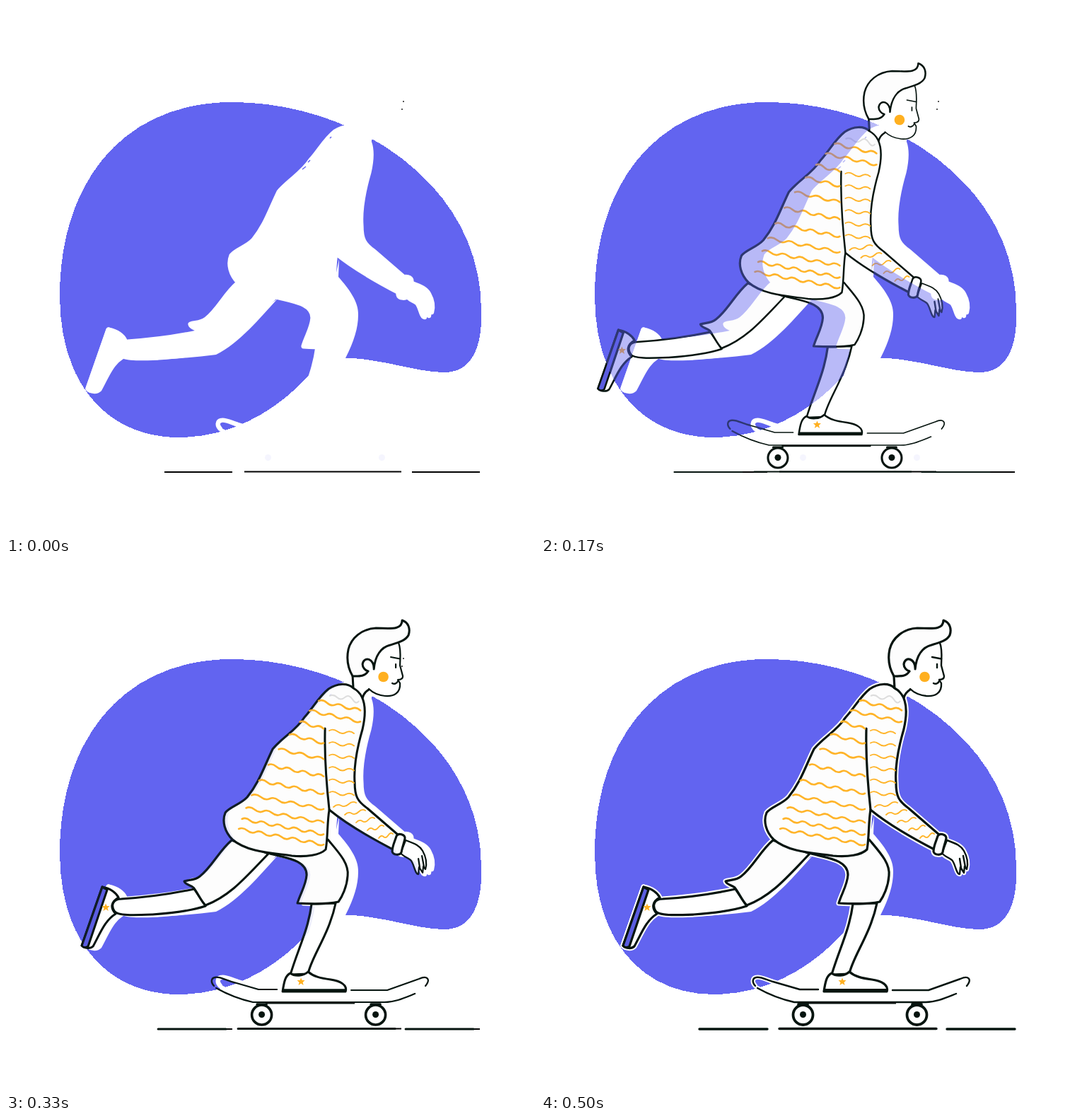
Recreate the animation shown at these times as an HTML page. Size 748x748 px, loop 8000 ms.

```html
<!DOCTYPE html>
<html lang="en">
<head>
<meta charset="utf-8">
<title>Skater</title>
<style>
  html, body { margin: 0; width: 100%; height: 100%; overflow: hidden; background: #fff; }
  svg { display: block; width: 100%; height: 100%; }
  /* --flat paints the whole figure in one colour, --thin slims its lines */
  #figure { stroke: var(--flat, #06140f); stroke-linecap: round; stroke-linejoin: round; fill: none; }
  .line { stroke-width: calc(3.2px - var(--thin, 0px)); }
  .fine { stroke-width: calc(2.4px - var(--thin, 0px)); }
  .bold { stroke-width: calc(3.8px - var(--thin, 0px)); }
  .earth { stroke-width: calc(3.4px - 2 * var(--thin, 0px)); }
  .skin { fill: var(--flat, #fff); }
  .cloth { fill: var(--flat, #fdfdfd); }
  .sole { fill: var(--flat, #5b5de0); }
  .dot { fill: #06140f; stroke: none; }
  .sun { fill: #ffb020; }
  #waves { fill: none; stroke: #ffb429; stroke-linecap: round; }
  #shadow { --flat: #000; --thin: -4px; }
</style>
</head>
<body>
<svg viewBox="0 0 748 748">
  <defs>
    <path id="star" d="M0-5.5 1.5-2 5.500-2 2.500 1 3.600 5 0 2.600-3.600 5-2.500 1-5.500-2-1.500-2Z"/>
    <path id="ground" d="M224 659H320M337 658.500H559M574 659H670"/>

    <mask id="cutout" maskUnits="userSpaceOnUse" x="0" y="0" width="748" height="748">
      <path fill="#fff" shape-rendering="crispEdges" d="M76 410C76 250 165 136 320 136C490 136 672 250 672 430C674 480 660 518 620 518C580 518 530 498 482 498C445 498 430 522 415 536C370 580 310 610 245 610C140 610 76 530 76 410Z"/>
      <use id="shadow" href="#figure"/>
      <path d="M165 499C210 502 255 498 297 493C330 477 360 440 384 414L291 480Z"/>
      <path d="M471 358L470 383C484 399 499 418 498 437C498 455 492 474 480 498L455 508L462 400Z"/>
      <path stroke="#fff" stroke-width="1.500" d="M419 231l5-4M427 221l3-3M458 187l2-2"/>
    </mask>

    <g id="figure">
      <!-- rear leg -->
      <path class="line skin" d="M275 461C242 468 205 473 172 475C160 475 157 484 162 492C166 499 190 498 216 497C245 495 270 492 291 485Z"/>
      <path class="line cloth" d="M328 392C310 407 300 430 283 443C276 449 266 448 261 450C262 455 270 455 274 459C281 468 284 477 291 484C327 470 348 444 380 411Z"/>
      <path class="line skin" d="M145 458C157 460 165 467 168 473C157 479 156 488 164 496C148 506 142 524 132 542C128 546 120 545 116 541Z"/>
      <path class="line sole" d="M145 458L116 541C118 544 122 544 125 542L152 462Z"/>

      <!-- board -->
      <path class="fine" d="M303 598C298 593 299 587 304 586C310 584 320 590 328 592L366 603H392M497 604H548L593 588C604 583 610 588 602 598M587 609C572 615 559 621 544 621H358C340 617 322 610 306 601"/>
      <path class="bold" d="M364 624H377M525 624H538"/>
      <g class="bold skin"><circle cx="370.500" cy="639" r="14"/><circle cx="531.500" cy="639" r="14"/></g>
      <g class="dot"><circle cx="370.500" cy="638.500" r="4.500"/><circle cx="531.500" cy="638.500" r="4.500"/></g>

      <!-- front leg -->
      <path class="line skin" d="M441 482C436 520 422 545 411 582L436 581C440 558 466 525 475 481Z"/>
      <path class="line cloth" d="M464 391C478 408 494 424 492 442C491 458 484 472 479 479C461 483 440 482 421 481C425 467 433 456 434 441C434 420 405 417 382 411Z"/>
      <path class="line skin" d="M411 580C404 583 402 592 400 606H489C492 597 482 591 468 589C454 587 444 585 436 578C430 584 417 585 411 580Z"/>
      <path class="bold" d="M401 604H489"/>

      <!-- hand and head -->
      <path class="fine skin" d="M574 392C588 397 594 400 598 407C603 416 604 426 602 433L599 429L598 438L593 430L592 440C587 440 586 425 581 420C576 416 570 415 567 410Z"/>
      <path class="fine" d="M592 418L594 431M597 414L600 430"/>
      <path class="skin" stroke="none" d="M499 158V180L515 192L524 180L560 184L564 113H530Z"/>
      <path class="fine skin" d="M564 113C568 123 566 136 566 145L570 160C570 164 567 165 563 165L566 170C567 184 557 189 545 188C536 187 528 184 522 178"/>
      <path class="line" d="M499 160L500 178M522 179C517 182 514 186 513 191"/>
      <path class="line cloth" d="M521 153C516 161 508 160 499 160C492 148 490 136 493 122C497 106 512 93 532 92C550 92 569 96 569 81C578 84 581 93 578 102C574 110 562 113 552 116C540 119 531 130 529 150C530 135 515 131 513 143C513 148 517 152 521 153"/>
      <path class="fine" d="M553 133L566 135.500M560 143V148M555 170C558 172 562 170 563 167"/>

      <!-- jumper -->
      <path class="line cloth" d="M500 177C492 169 477 170 465 178C451 189 443 205 431 218C419 237 400 246 386 263C373 290 367 310 350 331C341 341 325 345 319 353C314 365 318 380 329 391C350 409 385 410 413 414C434 416 453 413 461 405C464 389 463 365 466 349C494 372 529 391 556 405L564 385L520 347C506 337 502 330 502 311C500 285 506 259 513 235C518 213 519 187 500 177Z"/>
      <path class="line" d="M460 234C459 274 462 313 466 349"/>
      <path class="line cloth" d="M561 386C564 381 573 384 573 389C572 395 569 402 568 409C566 414 556 413 555 408C555 400 559 393 561 386Z"/>
    </g>

    <g id="skater">
      <use href="#ground" class="earth" stroke="#06140f" stroke-linecap="round"/>
      <use href="#figure"/>
      <path class="line" stroke="#06140f" d="M376 622H502"/>
      <g class="sun">
        <use href="#star" x="150" y="487"/>
        <use href="#star" x="426" y="592"/>
        <circle cx="542.500" cy="161" r="7.300"/>
      </g>
      <path fill="none" stroke="#ddd" stroke-width="2" d="M466 188q6-3 11 2t11 0t11 3t9 2"/>
      <g id="waves"></g>
    </g>
  </defs>

  <use href="#ground" stroke="#000" stroke-width="1.800"/>
  <path d="M561 135h2M559 146h2" stroke="#222" stroke-width="1.500"/>
  <use id="solid" href="#skater"/>
  <g mask="url(#cutout)">
    <rect width="748" height="748" fill="#6264f0"/>
    <use id="ghost" href="#skater"/>
  </g>
</svg>
<script>
  const LOOP = 8000, STEPS = 15, SLIDE = 80;
  const $ = id => document.getElementById(id);
  const solid = $('solid'), ghost = $('ghost');

  function wave(x, y, w, h, width) {
    const n = Math.max(3, Math.round(w / 12));
    const dx = w / n, dy = h / n;
    const turns = `t${dx} ${dy}`.repeat(n - 1);
    return `<path stroke-width="${width}" d="M${x} ${y}q${dx / 2} ${dy / 2 - 4} ${dx} ${dy}${turns}"/>`;
  }

  // Stripes follow the slope of the back, then hang down the sleeve and forearm
  function stripes() {
    let out = '';
    for (let i = 0; i <= 10; i++) {
      const drop = 18.1 * i - 7 * Math.sin(Math.PI * i / 5);
      const x = 451 - 0.95 * drop + 0.0018 * drop ** 2;
      const right = i < 2 ? 510 : 458;
      out += wave(x, 195 + drop, right - x, (right - x) / 7 + 5, 2.6);
    }
    for (let i = 0; i < 6; i++) out += wave(466, 237 + 17.5 * i, 35, 4, 1.9);
    for (let i = 0; i < 5; i++) out += wave(472 + 16 * i, 345 + 11 * i, 32 - 3 * i, -6, 1.9);
    return out;
  }
  $('waves').innerHTML = stripes();

  function render(t) {
    let step = Math.min(STEPS, Math.floor(t * 0.03) + 1);
    if (Math.round(step * 10 / 3) * 10 > t) step--;
    const rest = (1 - step / STEPS) ** 2;
    const shift = `translate(${-SLIDE * rest} 0)`;
    solid.setAttribute('transform', shift);
    ghost.setAttribute('transform', shift);
    ghost.setAttribute('opacity', 1 - rest);
    // On white the figure pops in once it is half opaque
    solid.setAttribute('visibility', rest < 0.5 ? 'visible' : 'hidden');
    solid.style.setProperty('--thin', `${rest * 1.6}px`);
  }

  const start = performance.now();
  function tick() {
    render((performance.now() - start) % LOOP);
    requestAnimationFrame(tick);
  }
  render(0);
  requestAnimationFrame(tick);
</script>
</body>
</html>
```
